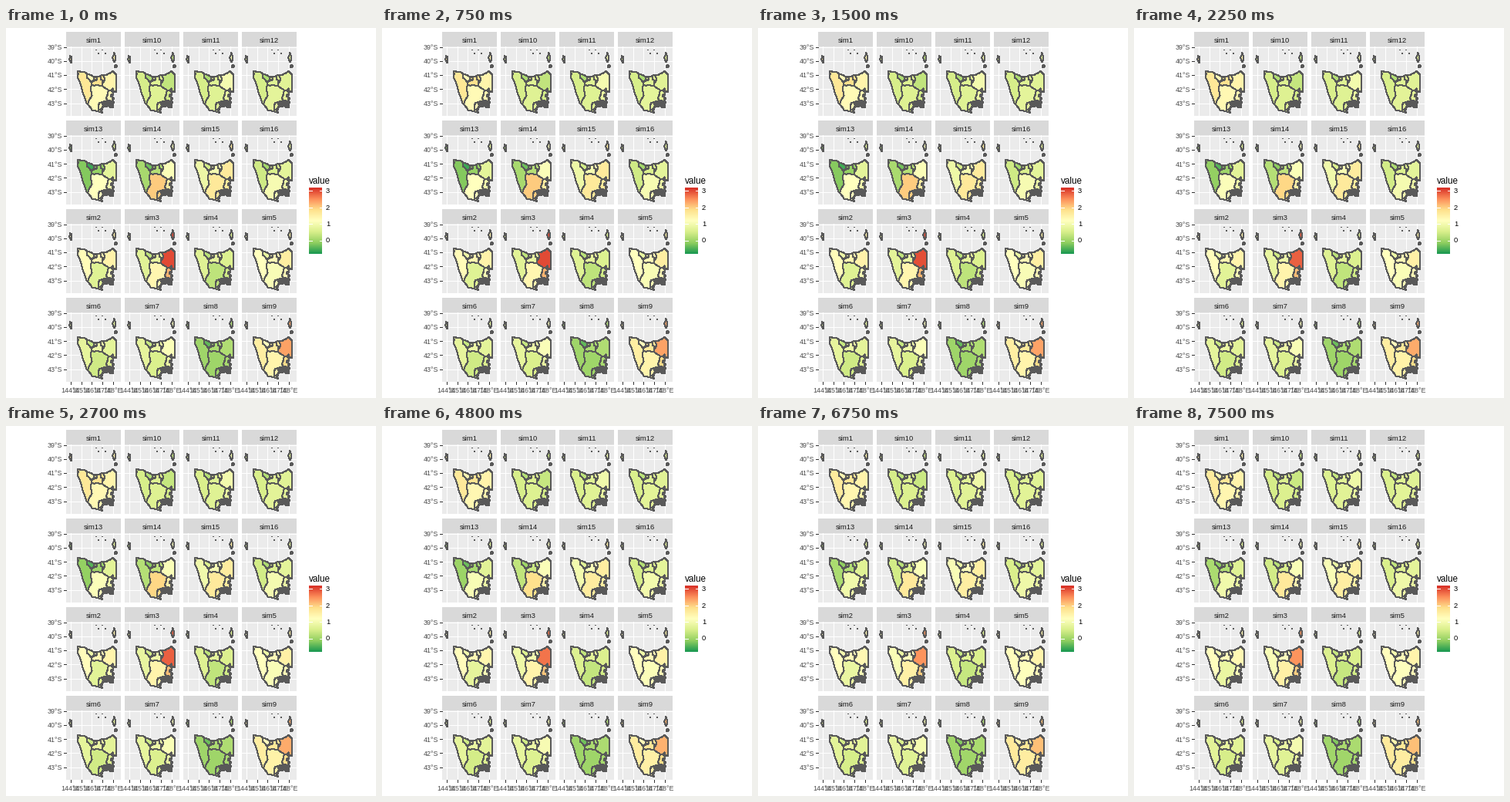
These frames come from a looping animation (480x480 px, 8 s). A matplotlib script:

```python
import numpy as np
import matplotlib.pyplot as plt
from matplotlib.animation import FuncAnimation
from matplotlib.colors import LinearSegmentedColormap
from matplotlib.patches import Polygon, Rectangle

SIZE, DPI = 480, 100
FONT = "Liberation Sans"
PX = 72 / DPI
GREY = "#595959"
CMAP = LinearSegmentedColormap.from_list("ryg", [
    "#1a9850", "#91cf60", "#d9ef8b", "#ffffbf", "#fee08b", "#fc8d59", "#d73027"])
STEP, TICK = 250, 750
PULL = .4                                # how far values move to their panel mean

# west, northeast, centre
SIMS = {
    "sim1": (.63, .56, .53), "sim10": (.33, .28, .36), "sim11": (.33, .45, .36),
    "sim12": (.33, .37, .38), "sim13": (.15, .38, .50), "sim14": (.22, .48, .71),
    "sim15": (.42, .61, .62), "sim16": (.31, .38, .46), "sim2": (.52, .57, .36),
    "sim3": (.37, .95, .55), "sim4": (.36, .35, .27), "sim5": (.50, .59, .47),
    "sim6": (.39, .38, .31), "sim7": (.39, .48, .34), "sim8": (.20, .24, .20),
    "sim9": (.59, .79, .56),
}

# degrees east of 144 and south of 39
COAST = [(.7, 1.7), (1.3, 1.8), (2.35, 2.17), (2.8, 2.05), (3.4, 2), (3.97, 1.74),
         (4.3, 1.95), (4.28, 3.2), (4, 3.1), (3.92, 3.65), (4, 4.15), (3.7, 4.2),
         (3.7, 3.95), (3.45, 3.9), (3.3, 4.1), (3.05, 4.25), (2.85, 4.62),
         (2.03, 4.54), (1.9, 4.3), (1.5, 4), (1.2, 3.3), (.95, 2.7), (.7, 2.2)]
# painted in this order and cut off at the coast
AREAS = [
    ("centre", [(2.6, 4.7), (2.7, 4), (3.3, 3.85), (3.5, 4.7)]),
    ("west", [(0, 1.5), (1.5, 1.5), (1.55, 2.2), (1.95, 2.5), (1.9, 3.1),
              (2.02, 3.45), (1.55, 4.1), (0, 4.1)]),
    ("east", [(2.9, 1.5), (5, 1.5), (5, 3.3), (3.6, 3.1), (2.95, 2.75), (3.15, 2.4)]),
    ("south", [(3.6, 3.1), (5, 3.3), (5, 4.4), (3.5, 4.1), (3.35, 3.6)]),
    ("north", [(1.95, 2.5), (2.5, 2.3), (2.5, 1.8), (2.9, 1.8), (3.15, 2.4),
               (2.95, 2.75), (2, 2.75)]),
    ("corner", [(1.5, 1.5), (2.2, 1.9), (2.2, 2.35), (1.95, 2.5), (1.55, 2.2)]),
    ("north", [(2.2, 1.9), (2.5, 1.8), (2.5, 2.3), (2.2, 2.35)]),
    ("north", [(2.85, 1.8), (3.05, 1.8), (3.2, 2.35), (3.1, 2.55), (2.85, 2.3)]),
]
ISLANDS = [("west", (.02, .86), .14, .29), ("east", (4.1, .75), .15, .33),
           ("east", (4.25, 1.38), .14, .1)]
ISLETS = [(2.38, .23), (2.65, .47), (3, .21), (3.3, .47)]


def rough(points, amount=.035, step=.11):
    """Closed outline with randomly bent sides; a shared side bends alike."""
    out = []
    for p, q in zip(points, points[1:] + points[:1]):
        a, b = np.array(sorted((p, q)))
        rng = np.random.default_rng([int(round(v * 100)) for v in (*a, *b)])
        d = b - a
        length = np.hypot(*d)
        n = max(2, int(length / step))
        off = rng.uniform(-amount, amount, n + 1)
        off[[0, -1]] = 0
        normal = np.array([-d[1], d[0]]) / length
        side = a + np.linspace(0, 1, n + 1)[:, None] * d + off[:, None] * normal
        out.extend((side if p <= q else side[::-1])[:-1])
    return np.array(out)


def blob(rng, centre, rx, ry, n=9):
    ang = np.linspace(0, 2 * np.pi, n, endpoint=False)
    r = rng.uniform(.6, 1.1, n)
    return np.array(centre) + np.c_[rx * r * np.cos(ang), ry * r * np.sin(ang)]


def broken_shore(n=34):
    """Islets and inlets scattered along the southeast coast."""
    rng = np.random.default_rng(5)
    shore = np.array(COAST[8:17])
    for pos in np.linspace(0, len(shore) - 1, n):
        at = [np.interp(pos, np.arange(len(shore)), shore[:, k]) for k in (0, 1)]
        yield blob(rng, at + rng.normal(0, .07, 2), *rng.uniform(.04, .11, 2), 6)


def values(west, east, centre):
    return dict(west=west, east=east, centre=centre, corner=west - .1,
                north=west + .03, south=(east + centre) / 2)


def place(pts, left, top):
    return np.asarray(pts) * (13.8, 18.25) + (left + 5.7, top + .5)


def box(x, y, w, h, color):
    ax.add_patch(Rectangle((x, y), w, h, fc=color, lw=0, antialiased=False))


def line(x0, y0, x1, y1, color, z=1):
    ax.plot([x0, x1], [y0, y1], color=color, lw=PX, solid_capstyle="butt",
            antialiased=False, zorder=z)


def label(x, y, s, px=8.9, color="#4d4d4d", ha="center"):
    ax.text(x, y, s, fontsize=px * PX, family=FONT, color=color,
            ha=ha, va="center_baseline")


def shape(pts, fc, clip=None):
    patch = Polygon(pts, fc=fc, ec=GREY, lw=PX, antialiased=False, zorder=2)
    ax.add_patch(patch)
    if clip:
        patch.set_clip_path(clip)
    return patch


fig = plt.figure(figsize=(SIZE / DPI, SIZE / DPI), dpi=DPI, facecolor="white")
ax = fig.add_axes([0, 0, 1, 1])
ax.axis("off")
ax.set_xlim(0, SIZE)
ax.set_ylim(SIZE, 0)

rng = np.random.default_rng(3)
coast = rough(COAST)
areas = [(key, rough(pts)) for key, pts in AREAS]
loose = [(key, blob(rng, *spec, 12)) for key, *spec in ISLANDS]
loose += [("south", pts) for pts in broken_shore()]
tinted = []

for i, (name, keys) in enumerate(SIMS.items()):
    left, top = 78 + 76 * (i % 4), 24 + 115 * (i // 4)
    box(left, top - 19, 71, 19, "#d9d9d9")
    box(left, top, 71, 90, "#ebebeb")
    label(left + 35.5, top - 8.5, name, 9.4, "#1a1a1a")
    for deg in range(5):
        x, y = place((deg, deg), left, top)
        line(left, y, left + 71, y, "white")
        line(x, top, x, top + 90, "white")
        if i % 4 == 0:
            line(left - 3, y, left, y, "#333333")
            label(left - 5, y, f"{39 + deg}°S", ha="right")
        if i >= 12:
            line(x, top + 90, x, top + 93, "#333333")
            label(x, top + 100.5, f"{144 + deg}°E")

    start, mean = values(*keys), np.mean(keys)
    main = shape(place(coast, left, top), "none")
    parts = [("centre", main)]
    parts += [(k, shape(place(p, left, top), "none", main)) for k, p in areas]
    shape(place(coast, left, top), "none")
    parts += [(k, shape(place(p, left, top), "none")) for k, p in loose]
    tinted += [(patch, start[k], mean) for k, patch in parts]
    for spot in ISLETS:
        x, y = place(spot, left, top)
        box(x - 1, y - .8, 2, 1.6, GREY)

# colour key
label(393, 197, "value", 11.6, "black", "left")
for y in range(207, 293):
    box(393, y, 17, 1, CMAP((292 - y) / 85))
for v in range(4):
    y = 275.5 - 21.4 * v
    line(393, y, 396.5, y, "white", 3)
    line(406.5, y, 410, y, "white", 3)
    label(415, y - .5, str(v), 9.4, "black", "left")


def progress(ms):
    """Even steps after a short rest, with a long pause halfway."""
    tick = ms // TICK
    k = min(tick, 4) + max(tick - 7, 0)
    return min(max((k - 1.8) / 4, 0), 1)


def draw(i):
    p = PULL * progress(i * STEP)
    for patch, start, mean in tinted:
        patch.set_facecolor(CMAP(start + p * (mean - start)))
    return [t[0] for t in tinted]


anim = FuncAnimation(fig, draw, frames=32, interval=STEP, repeat=True,
                     repeat_delay=0, blit=False)
plt.show()
```
